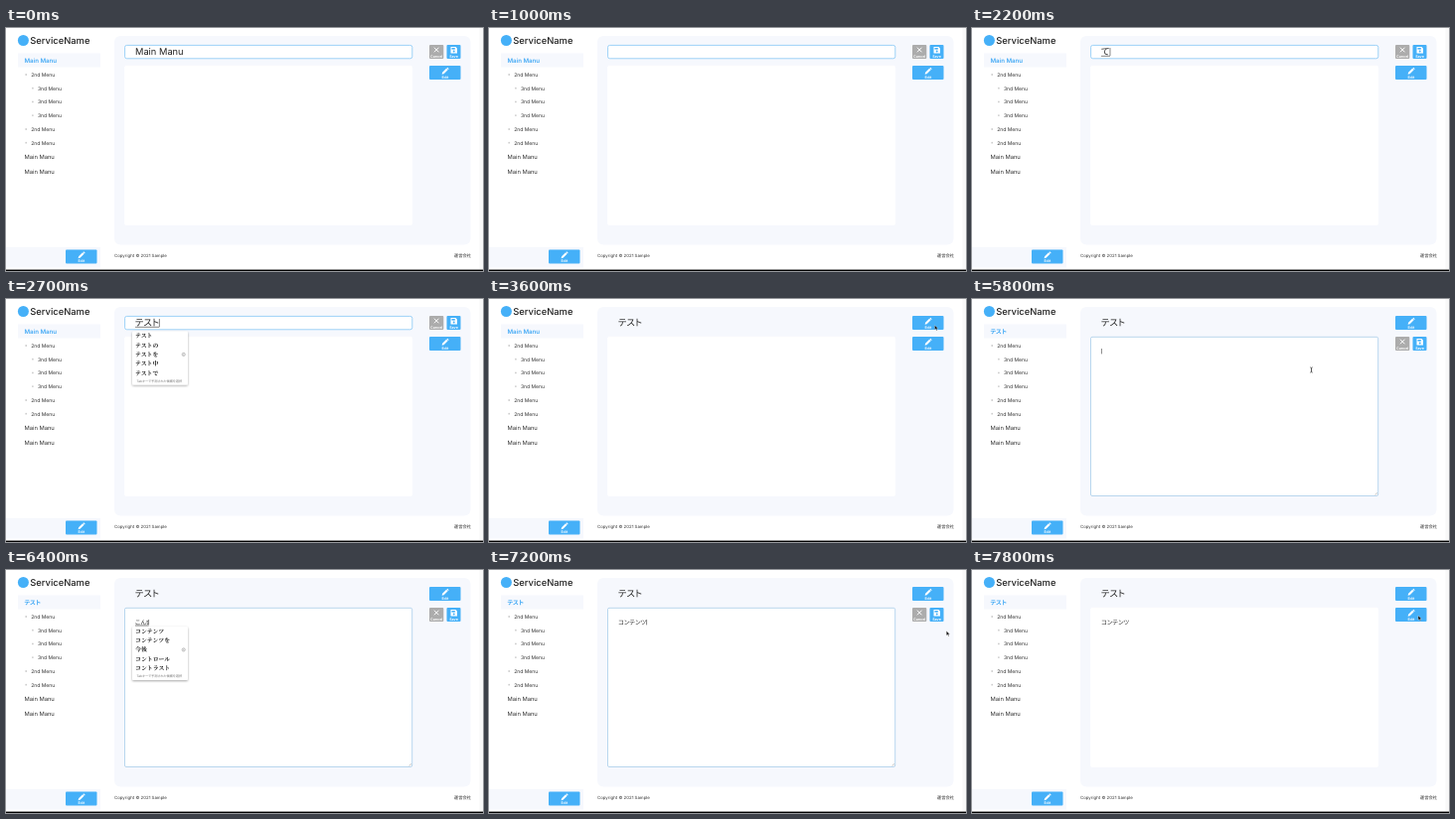
An HTML page that plays this animation: 480x245 px, repeating every 8 s.

```html
<!DOCTYPE html>
<html lang="ja">
<head>
<meta charset="utf-8">
<title>Inline editing</title>
<style>
  html, body { margin: 0; width: 100%; height: 100%; overflow: hidden; background: #fff; }
  svg { display: block; width: 480px; height: 245px; }
  text {
    font: 5.8px Inter, "Noto Sans CJK JP", "Noto Sans CJK", sans-serif;
    font-feature-settings: "palt";
    text-rendering: geometricPrecision;
    fill: #333;
  }
  .brand { font-size: 9.4px; font-weight: 500; fill: #222; }
  .active { font-size: 6.1px; font-weight: 600; fill: #43aaf5; }
  .sub { font-size: 5.05px; }
  .foot { font-size: 4.35px; }
  .title { font-size: 9.3px; font-weight: 500; fill: #222; }
  .body { font-size: 6.2px; }
  .label { font-size: 3.7px; font-weight: 600; fill: #fff; text-anchor: middle; }
  .candidate { font: bold 5.9px "Noto Serif CJK JP", "Noto Sans CJK JP", "Noto Sans CJK", serif; fill: #111; }
  .hint { font-size: 3.2px; fill: #777; }
  .panel { fill: #f6f8fd; }
</style>
</head>
<body>
<svg viewBox="0 0 480 245">
  <defs>
    <filter id="shadow" x="-20%" y="-20%" width="140%" height="140%">
      <feDropShadow dx="0" dy="1" stdDeviation="1.2" flood-opacity=".35"/>
    </filter>
    <g id="edit">
      <rect width="31.5" height="14" rx="1" fill="#45b0f8"/>
      <path d="M12.6 8.8l.5-2 4-4 1.5 1.5-4 4zM17.5 2.4l.7-.7 1.5 1.5-.7.7z" fill="#fff"/>
      <text class="label" x="15.8" y="12.7">Edit</text>
    </g>
    <g id="actions">
      <rect width="14.3" height="14" rx="1" fill="#acacac"/>
      <path d="M4.9 2.7l4.6 4.6m0-4.6l-4.6 4.6" stroke="#fff"/>
      <text class="label" x="7.15" y="12.7">Cancel</text>
      <rect x="17.5" width="14" height="14" rx="1" fill="#45b0f8"/>
      <path d="M21.5 2h5l1.5 1.5v5h-6.5z" fill="#fff"/>
      <path d="M22.5 3h3.3v1.6h-3.3z" fill="#45b0f8"/>
      <circle cx="24.7" cy="6.5" r="1" fill="#45b0f8"/>
      <text class="label" x="24.5" y="12.7">Save</text>
    </g>
  </defs>

  <rect width="480" height="245" fill="#fff"/>
  <rect x="476.5" width="3.5" height="243.5" fill="#f8f8f8"/>

  <circle cx="17.4" cy="12.5" r="5.5" fill="#45b0f8"/>
  <text class="brand" x="24.2" y="16">ServiceName</text>
  <rect class="panel" x="12" y="25.5" width="83" height="14"/>
  <text id="menuTitle" class="active" x="18.5" y="34.7"></text>
  <g id="menu"></g>
  <rect class="panel" y="221" width="95" height="20.5"/>
  <use href="#edit" x="60" y="223.5"/>

  <rect class="panel" x="109" y="8" width="358.5" height="210.5" rx="6"/>
  <text class="foot" x="109" y="231">Copyright © 2021 Sample</text>
  <text class="foot" x="450.8" y="231">運営会社</text>

  <rect id="titleBox" x="119.6" y="17.4" width="289.2" height="13.4" rx="2" fill="#fff" stroke="#93cdf6" stroke-width=".9"/>
  <rect id="bodyBox" x="119.5" y="38.3" width="289.2" height="160.2" rx="1.5" fill="#fff" stroke-width=".8"/>
  <path id="grip" d="M405.5 197.5l2.4-2.4m-1 2.4l1-1" stroke="#888" stroke-width=".4"/>
  <text id="title" class="title" x="130" y="27.3"></text>
  <text id="body" class="body" x="130" y="54.8"></text>
  <path id="underline" stroke="#333" stroke-width=".6"/>
  <path id="caret" stroke="#333" stroke-width=".6"/>

  <use id="titleEdit" href="#edit" x="426" y="17"/>
  <use id="titleActions" href="#actions" x="426" y="17"/>
  <use id="bodyEdit" href="#edit" x="426" y="38"/>
  <use id="bodyActions" href="#actions" x="426" y="38"/>

  <g id="popup">
    <rect width="56" height="54" rx="1.5" fill="#fff" filter="url(#shadow)"/>
    <g id="candidates"></g>
    <circle cx="51.7" cy="23.4" r="1.6" fill="none" stroke="#666" stroke-width=".4"/>
    <path d="M51.7 23v1.3m0-2v.4" stroke="#666" stroke-width=".4"/>
    <text class="hint" x="4.5" y="51.3">Tabキーで予測された候補を選択</text>
  </g>
  <path id="arrow" d="M0 0v4.6l1.1-1 .8 1.7.8-.4-.8-1.6h1.5z" fill="#111" stroke="#fff" stroke-width=".3"/>
  <path id="beam" d="M-1.4-2.6q1.4 0 1.4.7v3.8q0 .7-1.4.7M1.4-2.6q-1.4 0-1.4.7v3.8q0 .7 1.4.7" fill="none" stroke="#333" stroke-width=".6"/>
  <rect y="243.6" width="480" height="1.4" fill="#000"/>
</svg>
<script>
const LOOP = 8000, STEP = 100;
const $ = id => document.getElementById(id);
const show = (id, on) => $(id).setAttribute("display", on ? "inline" : "none");
const between = (t, a, b) => t >= a && t < b;

const menu = [
  [1, "2nd Menu", 47], [2, "3nd Menu", 60.7], [2, "3nd Menu", 74.4], [2, "3nd Menu", 88.1],
  [1, "2nd Menu", 102], [1, "2nd Menu", 115.7], [0, "Main Manu", 130.5], [0, "Main Manu", 145.5]
];
$("menu").innerHTML = menu.map(([level, label, y]) => {
  const x = 18.5 + level * 6.7;
  const dot = level ? `<circle cx="${x - 5}" cy="${y}" r=".9" fill="#ccc"/>` : "";
  return `${dot}<text class="${level ? "sub" : ""}" x="${x}" y="${y + 1.9}">${label}</text>`;
}).join("");

const candidateHtml = words => words
  .map((word, i) => `<text class="candidate" x="3" y="${6.7 + i * 9.35}">${word}</text>`).join("");
const titleWords = candidateHtml(["テスト", "テストの", "テストを", "テスト中", "テストで"]);
const bodyWords = candidateHtml(["コンテンツ", "コンテンツを", "今後", "コントロール", "コントラスト"]);

// [time, value] pairs, each held until the next one
const titleKeys = [
  [0, "Main Manu"], [100, "Main Man"], [300, "Main Ma"], [400, "Main"], [500, "Ma"], [600, ""],
  [1200, "t"], [2200, "て"], [2300, "てs"], [2400, "てす"], [2500, "てすt"], [2600, "てすと"], [2700, "テスト"]
];
const bodyKeys = [
  [0, ""], [6000, "k"], [6100, "こ"], [6200, "こn"], [6300, "こん"], [6400, "こんt"],
  [6500, "こんて"], [6600, "こんてn"], [6700, "こんてん"], [6800, "こんてんつ"], [6900, "コンテンツ"]
];
const held = (keys, t) => keys.filter(([at]) => at <= t).pop()[1];

// [time, x, y] points of the mouse
const titlePath = [[2900, 477, 36], [3100, 472, 28], [3400, 448.5, 26.5], [3600, 448.5, 26.5],
  [4000, 449, 46], [4300, 449, 46], [4700, 341.5, 71.5]];
const bodyPath = [[7000, 463, 76], [7200, 460.3, 61.5], [7600, 449, 46], [8000, 449, 46]];
function along(path, t) {
  const i = path.findIndex(p => p[0] > t);
  if (i < 0) return path[path.length - 1].slice(1);
  const [a, b] = [path[Math.max(i - 1, 0)], path[i]];
  const u = Math.max(0, (t - a[0]) / (b[0] - a[0]));
  const eased = u * u * (3 - 2 * u);
  return [1, 2].map(k => a[k] + (b[k] - a[k]) * eased);
}

function placeMouse(t) {
  const path = t < 6000 ? titlePath : bodyPath;
  const visible = between(t, 2900, 6000) || t >= 7000;
  const overText = between(t, 4500, 6000);
  show("arrow", visible && !overText);
  show("beam", visible && overText);
  const [x, y] = along(path, t);
  for (const id of ["arrow", "beam"]) $(id).setAttribute("transform", `translate(${x} ${y})`);
}

function placeCaret(t, inTitle) {
  const field = $(inTitle ? "title" : "body");
  const end = 130 + (field.textContent ? field.getComputedTextLength() : 0) + .4;
  const [top, bottom, base] = inTitle ? [20, 28, 28.3] : [50, 55.4, 56];
  const blinkedOff = t < 100 || between(t, 1000, 1200) || between(t, 1700, 2200) || between(t, 5300, 5800);
  const focused = t < 3600 || between(t, 4800, 7800);
  show("caret", focused && !blinkedOff);
  $("caret").setAttribute("d", `M${end} ${top}V${bottom}`);
  show("underline", between(t, 1200, 2800) || between(t, 6000, 7000));
  $("underline").setAttribute("d", `M130 ${base}H${end}`);
}

function render(t) {
  const editTitle = t < 3600, editBody = between(t, 4300, 7800);
  const inTitle = t < 4300;
  $("title").textContent = held(titleKeys, t);
  $("title").style.fontWeight = editTitle ? 400 : 500;
  $("body").textContent = held(bodyKeys, t);
  $("menuTitle").textContent = t < 3700 ? "Main Manu" : "テスト";

  show("titleBox", editTitle);
  show("titleActions", editTitle);
  show("titleEdit", !editTitle);
  show("bodyActions", editBody);
  show("bodyEdit", !editBody);
  show("grip", editBody);
  $("bodyBox").setAttribute("stroke", editBody ? "#a9cdea" : "#fff");

  show("popup", between(t, 2300, 2800) || between(t, 6100, 6900));
  $("popup").setAttribute("transform", `translate(127 ${inTitle ? 32.5 : 57})`);
  $("candidates").innerHTML = inTitle ? titleWords : bodyWords;

  placeCaret(t, inTitle);
  placeMouse(t);
}

const start = performance.now();
function tick() {
  const t = (performance.now() - start) % LOOP;
  render(Math.floor(t / STEP) * STEP);
  requestAnimationFrame(tick);
}
tick();
</script>
</body>
</html>
```
